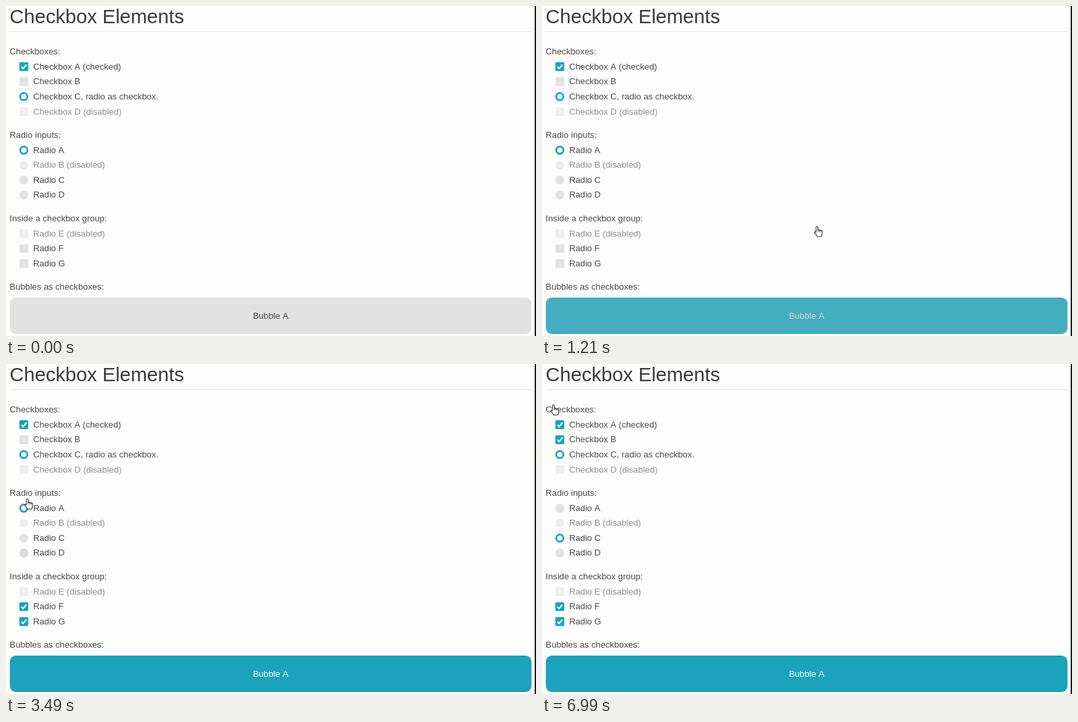
An HTML page with a canvas for the animation above (7070 ms loop, 800x498 px).

```html
<!DOCTYPE html>
<html lang="en">
<head>
<meta charset="utf-8">
<title>Checkbox Elements</title>
<style>
html, body { margin: 0; width: 100%; height: 100%; overflow: hidden; background: #fdfdfd; }
canvas { display: block; width: 800px; height: 498px; }
</style>
</head>
<body>
<canvas id="stage" width="800" height="498"></canvas>
<script>
const ctx = document.getElementById('stage').getContext('2d');
const LOOP = 7070;
const FADE = 300;
const FONT = '"Liberation Sans", Arial, sans-serif';

const PAPER = [253, 253, 253], INK = [74, 74, 74], FAINT = [142, 142, 142];
const IDLE = [226, 226, 227], HOVER = [204, 204, 204], OFF = [238, 238, 238];
const TEAL = [26, 163, 186];
const BUBBLE = [226, 226, 226], BUBBLE_HOVER = [208, 208, 208], WHITE = [255, 255, 255];

const headings = [
  ['Checkboxes:', 69], ['Radio inputs:', 195],
  ['Inside a checkbox group:', 321], ['Bubbles as checkboxes:', 424.2]
];

// on / off: time of the click that sets or clears the input
const rows = [
  { label: 'Checkbox A (checked)', y: 91.5, on: -LOOP },
  { label: 'Checkbox B', y: 114.2, on: 5700 },
  { label: 'Checkbox C, radio as checkbox.', y: 136.8, on: -LOOP, round: true },
  { label: 'Checkbox D (disabled)', y: 159.4, disabled: true },
  { label: 'Radio A', y: 217.6, on: -LOOP, off: 4150, round: true },
  { label: 'Radio B (disabled)', y: 240.2, disabled: true, round: true },
  { label: 'Radio C', y: 262.8, on: 4150, round: true },
  { label: 'Radio D', y: 285.2, round: true },
  { label: 'Radio E (disabled)', y: 343.4, disabled: true },
  { label: 'Radio F', y: 366.1, on: 2350 },
  { label: 'Radio G', y: 388.7, on: 2900 }
];
const BUBBLE_CLICK = 1095;
const BASELINE = 4.2;

// pointer stops: time, x, y
const path = [
  [260, 812, 395], [480, 705, 373], [650, 608, 355], [780, 495, 337],
  [910, 430, 338], [1210, 417, 340], [1400, 412, 340], [1930, 60, 286],
  [2110, 34, 274], [2500, 34, 274], [2700, 34, 292], [3150, 34, 292],
  [3490, 34, 211], [3700, 34, 190], [4500, 34, 190], [5150, 19, 69], [LOOP, 19, 69]
];

const hand = new Path2D('M2.7 9.6V2.1a1.4 1.4 0 0 1 2.8 0V6.4' +
  'a1.2 1.2 0 0 1 2.3 .3a1.2 1.2 0 0 1 2.2 .5a1.1 1.1 0 0 1 2 .8V11' +
  'Q12 13.2 10.7 16H4.5Q3.6 13.6 1 11.1Q-.2 9.5 .9 8.8Q1.9 8.5 2.7 9.6Z');
const knuckles = new Path2D('M5.5 6.4V8.8M7.8 6.8V9M10 7.3V9.2');

const clamp = v => Math.max(0, Math.min(1, v));
const rgb = c => `rgb(${c.map(Math.round).join(',')})`;
const mix = (a, b, p) => a.map((v, i) => v + (b[i] - v) * p);
const fade = (t, start) => start === undefined ? 0 : 1 - (1 - clamp((t - start) / FADE)) ** 3;

function pointer(t) {
  if (t < path[0][0]) return null;
  let i = 0;
  while (i < path.length - 2 && t >= path[i + 1][0]) i++;
  const [t0, x0, y0] = path[i], [t1, x1, y1] = path[i + 1];
  let p = clamp((t - t0) / (t1 - t0));
  if (t0 >= 1400) p = p * p * (3 - 2 * p);
  return { x: x0 + (x1 - x0) * p, y: y0 + (y1 - y0) * p };
}

// the hand is shown above the spot it acts on
function hoverY(t) {
  const pos = pointer(t);
  return pos && pos.x < 795 ? 114 + (pos.y - 69) / 0.81 : -100;
}

// share of recent time spent over a band, giving a soft hover change
function hover(t, top, bottom) {
  let hits = 0;
  for (let i = 0; i < 8; i++) {
    const y = hoverY(t - i * 20);
    if (y >= top && y < bottom) hits++;
  }
  return hits / 8;
}

function text(str, x, y, color, size = 13.2, align = 'left') {
  ctx.font = `${size}px ${FONT}`;
  ctx.textAlign = align;
  ctx.fillStyle = rgb(color);
  ctx.fillText(str, x, y);
}

function box(x, y, w, h, r, color) {
  ctx.fillStyle = rgb(color);
  ctx.beginPath();
  ctx.roundRect(x, y, w, h, r);
  ctx.fill();
}

function disc(x, y, r, color) {
  ctx.fillStyle = rgb(color);
  ctx.beginPath();
  ctx.arc(x, y, r, 0, Math.PI * 2);
  ctx.fill();
}

function drawRow(row, t) {
  const on = fade(t, row.on) * (1 - fade(t, row.off));
  const rest = row.disabled ? OFF : mix(IDLE, HOVER, hover(t, row.y - 11.3, row.y + 11.3));
  const color = mix(rest, TEAL, on);
  if (row.round) {
    disc(26.9, row.y, 6.8, color);
    if (on > 0) disc(26.9, row.y, 4 * on, PAPER);
  } else {
    box(20.2, row.y - 6.7, 13.4, 13.4, 1.6, color);
    if (on > 0) {
      ctx.globalAlpha = on;
      ctx.strokeStyle = '#fff';
      ctx.lineWidth = 2;
      ctx.beginPath();
      ctx.moveTo(23.2, row.y + 0.3);
      ctx.lineTo(25.8, row.y + 2.9);
      ctx.lineTo(30.8, row.y - 3);
      ctx.stroke();
      ctx.globalAlpha = 1;
    }
  }
  text(row.label, 41, row.y + BASELINE, row.disabled ? FAINT : INK);
}

function drawBubble(t) {
  const on = fade(t, BUBBLE_CLICK);
  const rest = mix(BUBBLE, BUBBLE_HOVER, hover(t, 438, 500));
  box(5.8, 440, 787.4, 55, 9, mix(rest, TEAL, on));
  text('Bubble A', 399.5, 471.8, mix(INK, WHITE, on), 13.2, 'center');
}

function drawHand(t) {
  const pos = pointer(t);
  if (!pos) return;
  ctx.save();
  ctx.translate(pos.x - 6, pos.y - 8);
  ctx.fillStyle = '#fff';
  ctx.strokeStyle = '#2c2c2c';
  ctx.lineWidth = 1.1;
  ctx.lineJoin = 'round';
  ctx.fill(hand);
  ctx.stroke(hand);
  ctx.lineWidth = 0.8;
  ctx.stroke(knuckles);
  ctx.restore();
}

function draw(t) {
  ctx.fillStyle = rgb(PAPER);
  ctx.fillRect(0, 0, 800, 498);
  text('Checkbox Elements', 5.6, 26, [60, 60, 60], 29.6);
  ctx.fillStyle = '#e6e6e8';
  ctx.fillRect(6, 38, 787, 1);
  for (const [label, y] of headings) text(label, 5.6, y + BASELINE, INK);
  for (const row of rows) drawRow(row, t);
  drawBubble(t);
  drawHand(t);
  ctx.fillStyle = '#1c1c1c';
  ctx.fillRect(798, 0, 2, 498);
}

const start = performance.now();
function tick(now) {
  draw(Math.max(0, now - start) % LOOP);
  requestAnimationFrame(tick);
}
draw(0);
requestAnimationFrame(tick);
</script>
</body>
</html>
```
